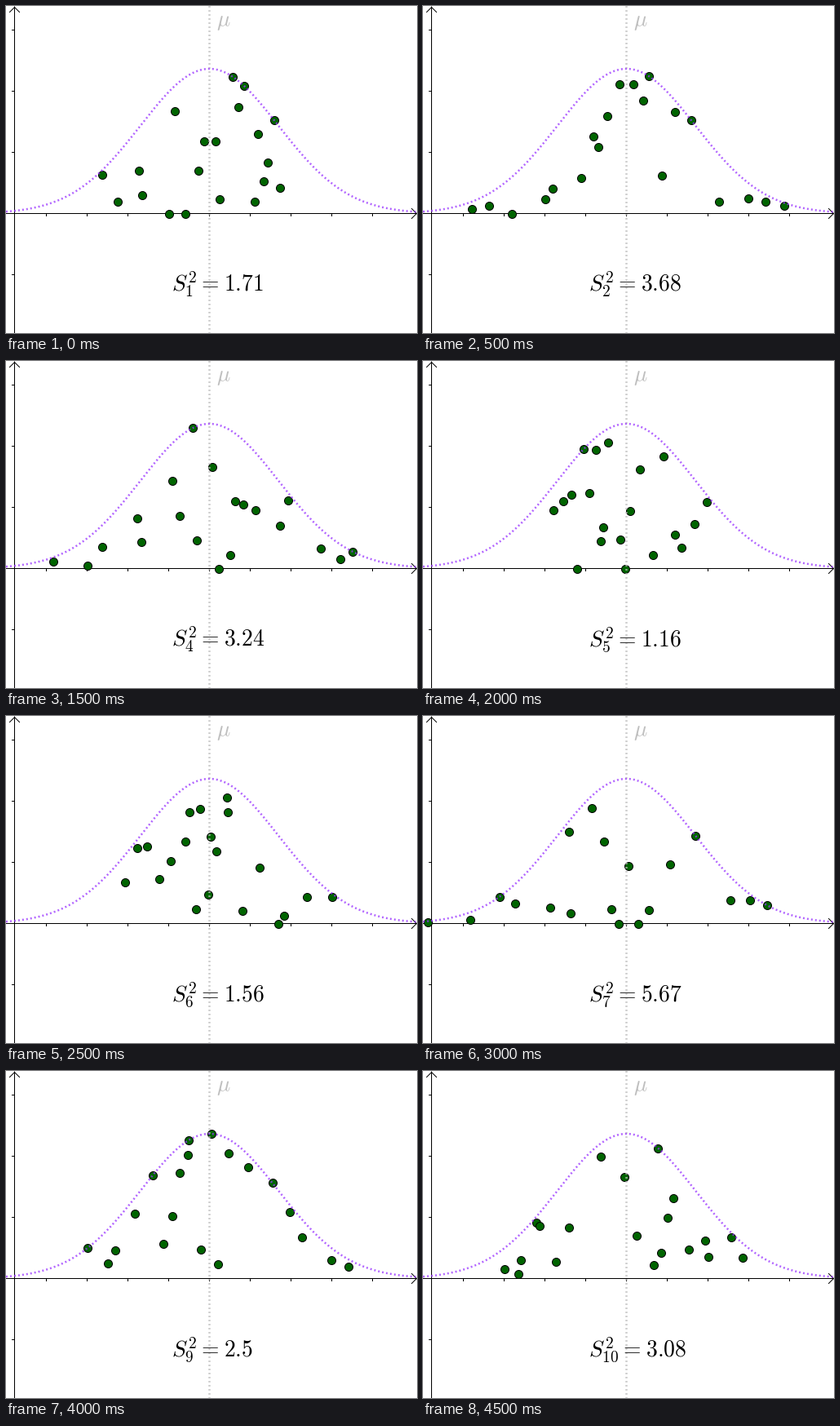
Write a matplotlib script that moves like this. It is 504x401 px and loops after 5000 ms.

```python
import numpy as np
import matplotlib.pyplot as plt
from matplotlib.animation import FuncAnimation

W, H, DPI = 504, 401, 64
PX = 72 / DPI                 # one pixel in points
MU, BASE, PEAK = 249.5, 254.5, 177.5
UNIT = 50                     # pixels per x unit
SPREAD = 14350                # twice the curve's variance, in pixels squared
DOTS = 20

# shown variance and the smallest, quartile and largest x of each sample
SAMPLES = [
    ("1.71", (118, 206, 262, 305, 336)),
    ("3.68", (60, 190, 250, 310, 443)),
    ("1.79", (120, 219, 246, 291, 420)),
    ("3.24", (58, 200, 255, 305, 425)),
    ("1.16", (160, 206, 232, 279, 348)),
    ("1.56", (146, 215, 250, 285, 400)),
    ("5.67", (-40, 155, 225, 281, 422)),
    ("1.79", (123, 184, 234, 260, 380)),
    ("2.5", (100, 189, 233, 295, 420)),
    ("3.08", (100, 156, 277, 307, 392)),
]

plt.rcParams["mathtext.fontset"] = "cm"


def curve(x):
    return PEAK * np.exp(-(x - MU) ** 2 / SPREAD)


def scatter(seed, quartiles):
    """Spread dots over the quartiles, at random tenths of the curve's height."""
    rng = np.random.default_rng(seed)
    p = np.linspace(0, 1, DOTS)
    p[1:-1] += rng.uniform(-0.025, 0.025, DOTS - 2)
    x = np.interp(p, np.linspace(0, 1, 5), quartiles)
    share = rng.integers(0, 11, DOTS) / 10
    return x, BASE - share * curve(x)


fig = plt.figure(figsize=(W / DPI, H / DPI), dpi=DPI, facecolor="white")
ax = fig.add_axes([0, 0, 1, 1])
ax.set(xlim=(0, W), ylim=(H, 0))
ax.axis("off")


def line(x, y, color="black", width=1, **kw):
    return ax.plot(x, y, color=color, lw=width * PX, snap=False, **kw)[0]


def dotted(x, y, color):
    line(x, y, color, 2.5, ls=(0, (0.8, 1.2)), dash_capstyle="butt",
         alpha=0.75, zorder=4)


# axes with open arrow heads and small ticks
line([10.5, 10.5], [1, H])
line([0, 503], [BASE, BASE])
line([4.5, 10.5, 16.5], [7.5, 1.5, 7.5])
line([497.5, 503.5, 497.5], [BASE - 6, BASE, BASE + 6])
for k in range(-4, 5):
    x = MU + k * UNIT
    line([x, x], [BASE, BASE + 3])
for k in (-3, -2, -1, 1):
    y = BASE + 1.5 * k * UNIT
    line([7.5, 10.5], [y, y])

xs = np.linspace(0, W, 505)
dotted([MU, MU], [0, H], "#bfbfbf")
dotted(xs, BASE - curve(xs), "#9933ff")
ax.text(258, 24, r"$\mu$", color="#bfbfbf", fontsize=27 * PX, va="baseline")

dots = line([], [], ls="none", marker="o", ms=10 * PX, mfc="#006400",
            mec="black", mew=PX, zorder=3)
label = ax.text(203, 350, "", fontsize=27.6 * PX, va="baseline", zorder=5)


def update(i):
    value, quartiles = SAMPLES[i]
    dots.set_data(*scatter(i + 1, quartiles))
    label.set_text(rf"$S_{{{i + 1}}}^2 = \hspace{{0.05}}{value}$")
    return dots, label


anim = FuncAnimation(fig, update, frames=len(SAMPLES), interval=500,
                     repeat=True, repeat_delay=0, blit=False)
plt.show()
```
